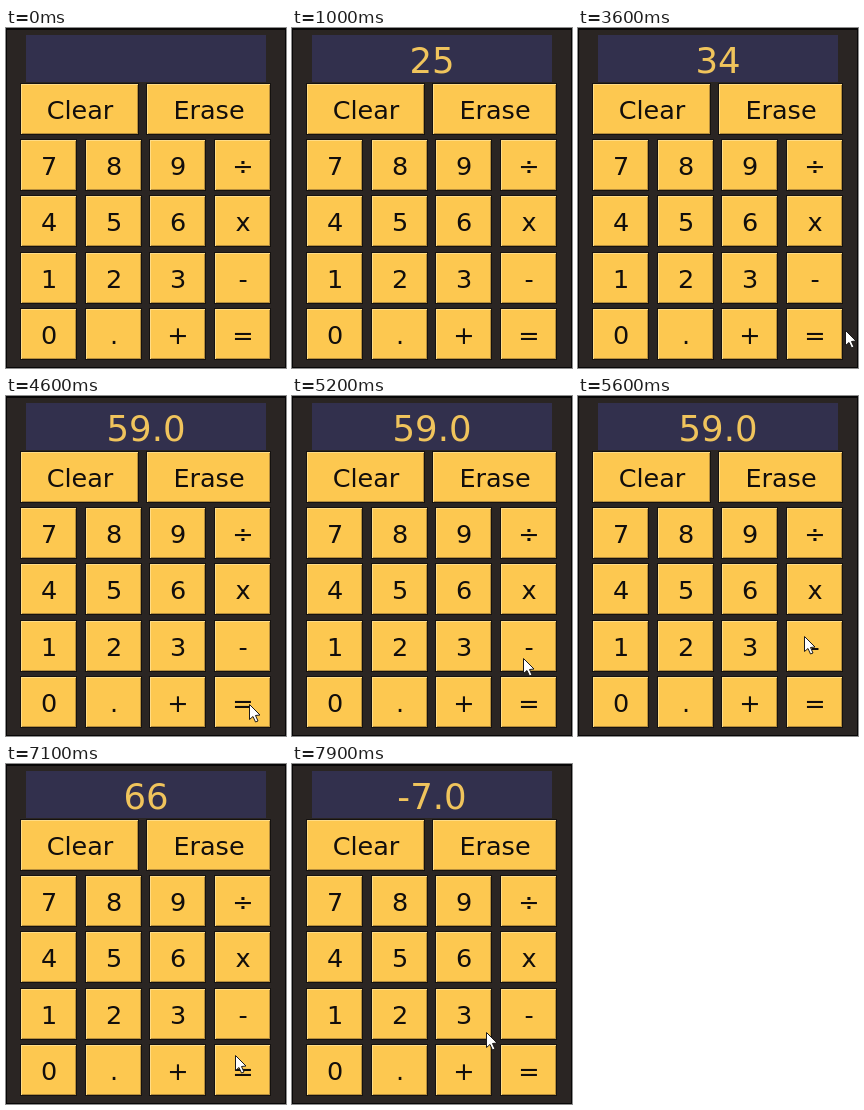
An HTML page with a canvas for the animation above (8000 ms loop, 280 px wide and 340 px high).

```html
<!DOCTYPE html>
<html lang="en">
<head>
<meta charset="utf-8">
<title>Calculator</title>
<style>
html, body { margin: 0; width: 280px; height: 340px; overflow: hidden; background: #2a2523; }
canvas { display: block; }
</style>
</head>
<body>
<canvas id="stage" width="280" height="340"></canvas>
<script>
const ctx = document.getElementById('stage').getContext('2d');
const LOOP = 8000;
const KEYS = ['789÷', '456x', '123-', '0.+='];
const ARROW = new Path2D('M0 0V15L3.5 12L6 17.5L8.5 16.5L6 11L10.5 10.5Z');

// Key presses: { time: key }
const PRESSES = {
  400: '2', 600: '5', 2000: '+', 2100: '3', 2300: '4', 4600: '=',
  5700: '-', 6200: '6', 6500: '6', 7400: '='
};

// Places where the pointer rests
const STOPS = [
  { from: 3600, to: 3600, x: 268, y: 302 },
  { from: 4200, to: 4700, x: 244, y: 308 },
  { from: 5500, to: 5600, x: 227, y: 240 },
  { from: 6200, to: 6600, x: 154, y: 204 },
  { from: 7300, to: 7500, x: 249, y: 312 },
  { from: 7900, to: 8000, x: 195, y: 268 }
];

// Replays the presses up to time t and returns the display text.
function readout(t) {
  let shown = '', stored = 0, op = '';
  for (const [time, key] of Object.entries(PRESSES)) {
    if (time > t) break;
    if (key === '=') {
      shown = (op === '+' ? stored + +shown : stored - shown).toFixed(1);
    } else if ('+-'.includes(key)) {
      [stored, op, shown] = [+shown, key, ''];
    } else {
      shown += key;
    }
  }
  return shown;
}

function rect(x, y, w, h, color) {
  ctx.fillStyle = color;
  ctx.fillRect(x, y, w, h);
}

function text(str, x, baseline, size, color) {
  ctx.font = `${size}px "DejaVu Sans", Verdana, sans-serif`;
  ctx.textAlign = 'center';
  ctx.fillStyle = color;
  ctx.fillText(str, x, baseline);
}

function key(label, x, y, w) {
  rect(x - 1, y - 1, w + 2, 52, '#151210');
  rect(x, y, w, 50, '#ffdc86');
  rect(x + 1, y + 1, w - 1, 49, '#b58d3c');
  rect(x + 1, y + 1, w - 2, 48, '#fdc850');
  text(label, x + w / 2 + 0.5, y + 35, 25.5, '#120e0c');
}

function pointer(t) {
  const i = STOPS.findLastIndex(s => s.from <= t);
  if (i < 0) return;
  const a = STOPS[i], b = STOPS[i + 1] ?? a;
  const k = Math.max(0, (t - a.to) / (b.from - a.to || 1));
  const ease = b === a ? 0 : k * k * (3 - 2 * k);
  const mix = axis => Math.round(a[axis] + (b[axis] - a[axis]) * ease);
  ctx.save();
  ctx.translate(mix('x') - 0.5, mix('y') + 0.5);
  ctx.fillStyle = '#fff';
  ctx.fill(ARROW);
  ctx.strokeStyle = '#1c1a1a';
  ctx.stroke(ARROW);
  ctx.restore();
}

function draw(t) {
  rect(0, 0, 280, 340, '#080707');
  rect(1, 2, 278, 337, '#2a2523');
  rect(20, 7, 240, 47, '#32304d');
  text(readout(t), 140, 44.5, 35.5, '#f0c45c');
  key('Clear', 15, 56, 117);
  key('Erase', 141, 56, 123);
  KEYS.forEach((row, r) => [...row].forEach((label, c) =>
    key(label, Math.round(15 + c * 64.6), Math.round(112 + r * 56.3), 55)));
  pointer(t);
}

const start = performance.now();
function frame() {
  const t = (performance.now() - start) % LOOP;
  draw(Math.floor(t / 100) * 100);
  requestAnimationFrame(frame);
}
frame();
</script>
</body>
</html>
```
